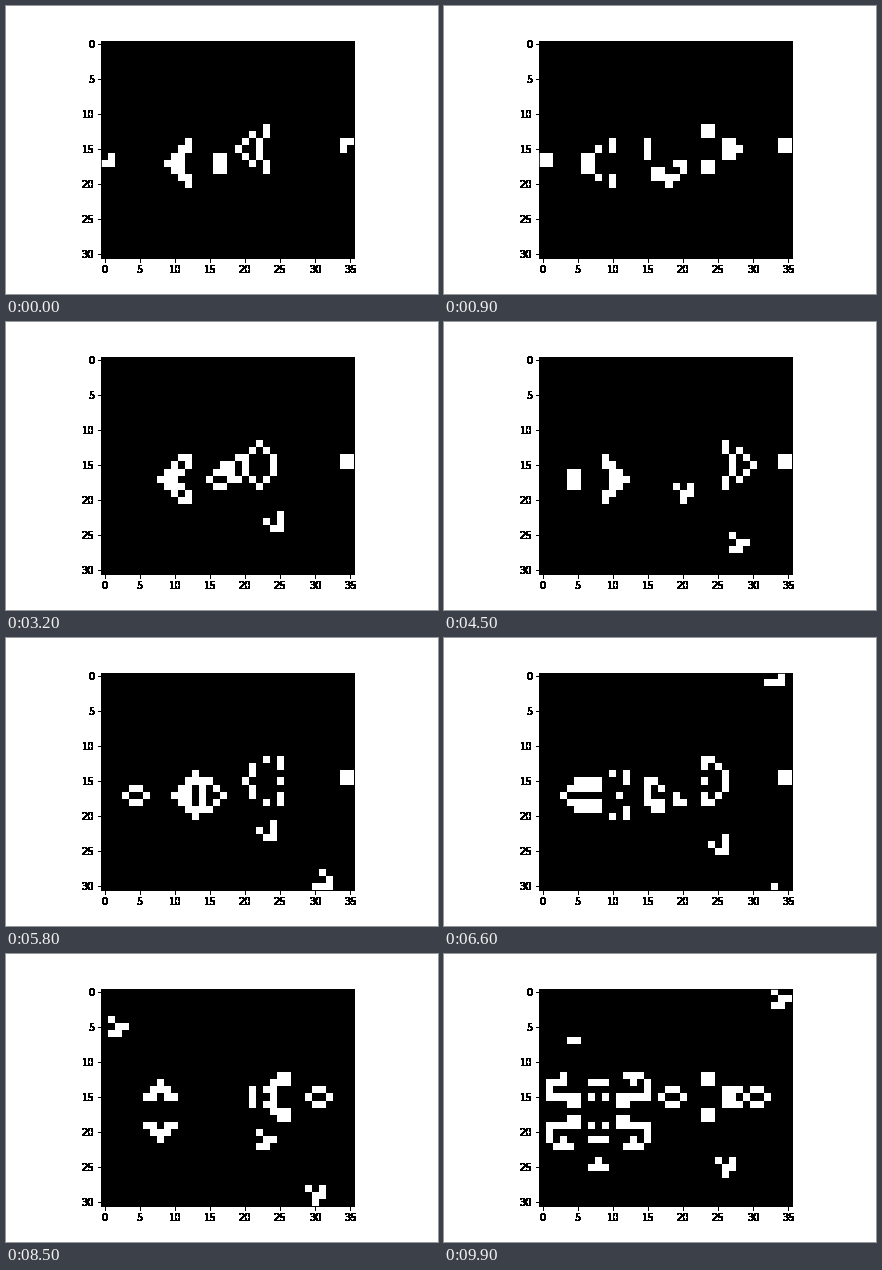
These frames come from a looping animation (432 px wide and 288 px high, 10 s). A matplotlib script:

```python
import numpy as np
import matplotlib.pyplot as plt
from matplotlib.animation import FuncAnimation

ROWS, COLS = 31, 36
FRAMES, INTERVAL = 100, 100


def mirror(grid, axis, cells):
    """Set (distance, column) cells on both sides of a row."""
    for d, col in cells:
        grid[[axis - d, axis + d], col] = 1


def glider_gun():
    grid = np.zeros((ROWS, COLS), int)
    grid[16:18, :2] = 1    # left block
    grid[14:16, -2:] = 1   # right block
    # left shuttle, symmetric about row 17
    grid[16:19, [10, 16]] = 1
    grid[17, [14, 17]] = 1
    mirror(grid, 17, [(2, 11), (2, 15), (3, 12), (3, 13)])
    # right shuttle, symmetric about row 15
    grid[14:17, 20:22] = 1
    mirror(grid, 15, [(2, 22), (2, 24), (3, 24)])
    return grid


def step(grid):
    """One Game of Life generation on a torus."""
    near = sum(
        np.roll(grid, (dy, dx), (0, 1))
        for dy in (-1, 0, 1)
        for dx in (-1, 0, 1)
        if dy or dx
    )
    return ((near == 3) | ((grid == 1) & (near == 2))).astype(int)


def evolve(grid, count):
    states = []
    for _ in range(count):
        grid = step(grid)
        states.append(grid)
    return states


def solid(img, dpi):
    """Make every touched pixel opaque, for hard-edged ink."""
    img[..., 3] = img[..., 3] > 0
    return img, 0, 0


plt.rcParams.update({"font.family": "DejaVu Sans", "font.size": 10})
fig, ax = plt.subplots(figsize=(6, 4), dpi=72, facecolor="white")
fig.subplots_adjust(left=0.125, right=0.9, bottom=0.125, top=0.88)

states = evolve(glider_gun(), FRAMES)
image = ax.imshow(states[0], cmap="gray", vmin=0, vmax=1)
ax.set_xticks(range(0, COLS, 5))
ax.set_yticks(range(0, ROWS, 5))
ax.set_agg_filter(solid)


def update(i):
    image.set_data(states[i])
    return [image]


anim = FuncAnimation(fig, update, frames=FRAMES, interval=INTERVAL,
                     repeat=True, repeat_delay=0)
plt.show()
```
